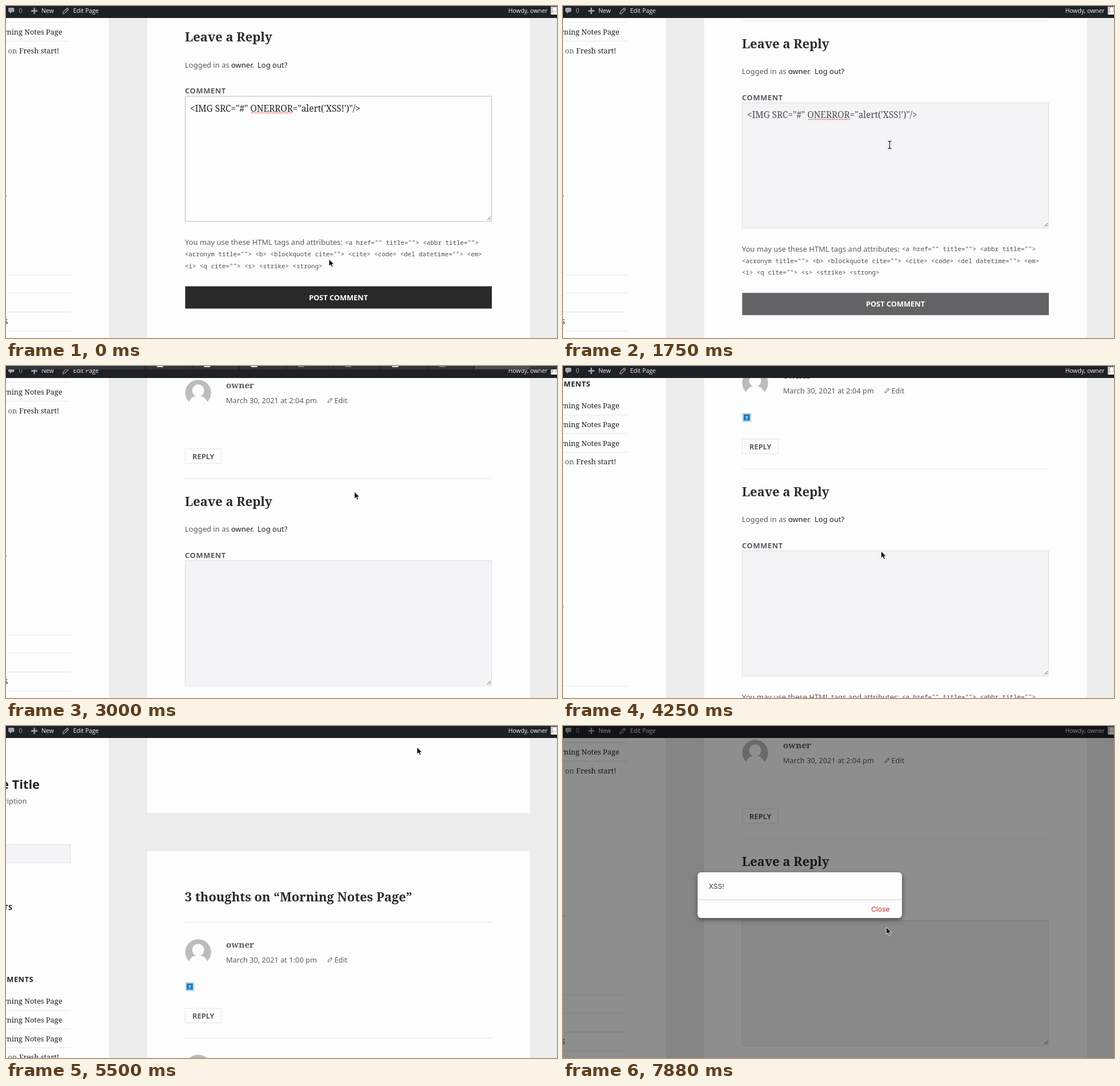
Recreate the animation shown at these times as an HTML page. Size 964 px wide and 581 px high, loop 8 s.

```html
<!DOCTYPE html>
<html lang="en">
<head>
<meta charset="utf-8">
<title>Comment form</title>
<style>
html, body { margin: 0; width: 100%; height: 100%; overflow: hidden; background: #eeedee; }
svg { display: block; width: 100vw; height: 100vh; }
text { font: 12.8px "Noto Sans", "Open Sans", sans-serif; fill: #5c5b5d; white-space: pre; }
.serif { font-family: "Noto Serif", serif; fill: #222123; }
.bold { font-weight: 700; }
.form { font-size: 13px; }
.h2 { font-size: 21.9px; font-weight: 700; fill: #2a292b; }
.name { font: 700 15.2px "Noto Serif", serif; }
.dark { fill: #222123; }
.caps { letter-spacing: .04em; }
.code { font: 10.83px "Noto Sans Mono", monospace; fill: #504f51; }
.bar text { font: 10.4px "Open Sans", "Noto Sans", sans-serif; fill: #f2f2f4; }
.end { text-anchor: end; }
.mid { text-anchor: middle; }
.box { font: 15.45px "Noto Serif", serif; }
.alert text { font: 12px Inter, sans-serif; fill: #3a393b; }
.rule { stroke: #e6e5e7; }
</style>
</head>
<body>
<svg viewBox="0 0 964 581" preserveAspectRatio="none">
  <defs>
    <clipPath id="disc"><circle r="22.8"/></clipPath>
    <g id="avatar" clip-path="url(#disc)">
      <circle r="22.8" fill="#bcbbbd"/>
      <circle cy="-4" r="10.5" fill="#fefdfe"/>
      <path d="M-18 24C-17 12-10 7-5 6H5C10 7 17 12 18 24Z" fill="#fefdfe"/>
    </g>
    <path id="pencil" d="M-4 4L-3.2 1.2L2-4L4-2L-1.2 3.2ZM.6-2.6L2.6-.6" fill="none" stroke="#626164"/>
    <g id="broken">
      <rect x="-8" y="-8" width="16" height="16" fill="#c9d9e3"/>
      <rect x="-5.5" y="-5.5" width="11" height="11" fill="#1b80c2"/>
      <text class="mid bold" y="3.5" style="font-size:9px;fill:#fff">?</text>
    </g>
    <filter id="shade" x="-10%" y="-30%" width="120%" height="170%">
      <feDropShadow dx="0" dy="3" stdDeviation="4" flood-opacity=".5"/>
    </filter>
  </defs>

  <rect width="964" height="581" fill="#eeedee"/>
  <rect width="180" height="581" fill="#fefdfe"/>
  <g id="side"></g>

  <g id="page">
    <rect x="247" y="-1000" width="670" height="399" fill="#fefdfe"/>
    <rect x="246.5" y="-534.5" width="671" height="1600" fill="#fefdfe" stroke="#e9e8ea"/>
    <text class="serif h2" x="313" y="-446">3 thoughts on “Morning Notes Page”</text>
    <path class="rule" d="M313-409.5H850"/>
    <g id="comments"></g>
    <text class="serif h2" x="313" y="244.5">Leave a Reply</text>
    <text class="form" x="313" y="290">Logged in as</text>
    <text class="form dark" x="394" y="290">owner<tspan fill="#5c5b5d">.</tspan></text>
    <text class="form dark" x="440" y="290">Log out?</text>
    <text class="form bold caps" x="313" y="335.5">COMMENT</text>
    <rect id="area" x="313.5" y="340.5" width="536" height="219"/>
    <g id="typed">
      <text id="input" class="box" x="322" y="367">&lt;IMG SRC="#" ONERROR="alert('XSS!')"/&gt;</text>
      <path d="M429 369.5H502" stroke="#e2423c" stroke-width="1.6" stroke-dasharray="1.6 1.4"/>
    </g>
    <path d="M842 557L848 551M845.5 557L848 554.5" stroke="#555" fill="none"/>
    <text class="form" x="313" y="600.5">You may use these HTML tags and attributes:</text>
    <g id="tags"></g>
    <rect id="post" x="313.5" y="673" width="536.5" height="39"/>
    <text class="bold mid" x="581.5" y="697" style="fill:#fff">POST COMMENT</text>
  </g>

  <g class="bar">
    <rect width="964" height="21" fill="#1e2126"/>
    <path d="M5.5 3H13Q14.5 3 14.5 4.5V9Q14.5 10.5 13 10.5H10L7 14V10.5H5.5Q4 10.5 4 9V4.5Q4 3 5.5 3Z" fill="#a2a5a9"/>
    <text x="22.5" y="12" style="fill:#a2a5a9">0</text>
    <path d="M44 8.5H55M49.5 3V14" stroke="#a2a5a9" stroke-width="2.4"/>
    <text x="62" y="12">New</text>
    <use href="#pencil" transform="translate(104.5 8.5) scale(1.25)" style="filter:brightness(1.6)"/>
    <text x="117.5" y="12">Edit Page</text>
    <text class="end" x="947.5" y="12">Howdy, owner</text>
    <rect x="953" y="1" width="13" height="14" fill="#c6c5c7"/>
    <circle cx="960" cy="6" r="3.3" fill="#fff"/>
    <ellipse cx="960" cy="14" rx="5.5" ry="4" fill="#fff"/>
    <rect y="15" x="950" width="14" height="6" fill="#1e2126"/>
  </g>
  <g id="tabs"></g>

  <rect id="dim" width="964" height="581"/>
  <g id="alert" class="alert">
    <rect x="235.5" y="256" width="357.5" height="80" rx="6" fill="#fefdfe" filter="url(#shade)"/>
    <path d="M235.5 304H593" stroke="#cfced0"/>
    <text x="255" y="285">XSS!</text>
    <text class="end" x="571.5" y="325" style="fill:#c0302c">Close</text>
  </g>

  <path id="arrow" d="M0 0V12.5L3 9.8L5 14.3L7.2 13.3L5.2 9H9Z" fill="#111" stroke="#fff" stroke-width=".9"/>
  <path id="beam" d="M-3-6.5Q0-6.5 0-5Q0-6.5 3-6.5M0-5V5M-3 6.5Q0 6.5 0 5Q0 6.5 3 6.5" fill="none" stroke="#222" stroke-width="1.3"/>
</svg>
<script>
const LOOP = 8000, STEP = 125, SIDE_MAX = 501.5, LOWEST = 106.5;
const el = id => document.getElementById(id);
const set = (id, attrs) => { for (const k in attrs) el(id).setAttribute(k, attrs[k]); };
const show = (id, on) => set(id, { visibility: on ? 'visible' : 'hidden' });
const move = (id, x, y) => set(id, { transform: `translate(${x} ${y})` });
const clamp = (v, lo, hi) => Math.min(hi, Math.max(lo, v));
const esc = s => s.replace(/</g, '&lt;').replace(/>/g, '&gt;');
const text = (cls, x, y, s) => `<text class="${cls}" x="${x}" y="${y}">${s}</text>`;
const rule = y => `<path class="rule" d="M0 ${y}H112.5"/>`;

// Piecewise linear track: rows of [time, value, ...]
function track(rows, t, col = 1) {
  let i = 0;
  while (i < rows.length - 2 && t >= rows[i + 1][0]) i++;
  const a = rows[i], b = rows[i + 1];
  return a[col] + (b[col] - a[col]) * clamp((t - a[0]) / (b[0] - a[0]), 0, 1);
}

el('side').innerHTML =
  text('bold end dark h2', 59, -392, 'Site Title') +
  text('end', 36.5, -366, 'Site description') +
  '<rect x="-100" y="-294" width="212.5" height="32" fill="#f4f3f5" stroke="#e2e1e3"/>' +
  text('bold caps end dark', 11.5, -180, 'RECENT POSTS') +
  text('bold caps end dark', 48, -54, 'RECENT COMMENTS') +
  [-15.2, 17.5, 50].map(y => text('serif end', 98.5, y, 'on Morning Notes Page')).join('') +
  '<text class="serif" x="3.5" y="82.5"><tspan fill="#5c5b5d">on</tspan></text>' +
  text('serif', 23, 82.5, 'Fresh start!') +
  [-3.5, 28.5, 61.5, 470.5, 502.5, 535.5, 568.5].map(rule).join('') +
  '<rect y="331" width="1" height="2" fill="#777"/>' +
  text('serif end', 3.5, 556.5, 'Entries RSS');

el('comments').innerHTML = ['1:00', '1:01', '2:04'].map((time, i) =>
  `<g transform="translate(0 ${(i - 2) * 202})">
    <use href="#avatar" x="336.2" y="46.8"/>
    ${text('name', 385, 39, 'owner')}
    ${text('', 385, 64.5, `March 30, 2021 at ${time} pm`)}
    <use href="#pencil" x="567" y="60"/>${text('', 574.5, 64.5, 'Edit')}
    <use class="pic" href="#broken" x="321.5" y="107"/>
    <rect x="313.5" y="145" width="63" height="25.5" fill="none" stroke="#e4e3e5"/>
    ${text('bold mid', 345.3, 162.5, 'REPLY')}
    <path class="rule" d="M313 197H850"/>
  </g>`).join('');

el('tags').innerHTML = [
  [593, '<a href="" title=""> <abbr title="">'],
  [313, '<acronym title=""> <b> <blockquote cite=""> <cite> <code> <del datetime=""> <em>'],
  [313, '<i> <q cite=""> <s> <strike> <strong>']
].map(([x, s], i) => text('code', x, 600 + i * 20.5, esc(s))).join('');

el('tabs').innerHTML = '<rect width="964" height="22" fill="#343538"/>' +
  '<rect x="820" width="97" height="22" fill="#4b4c4f"/>' +
  [0, 1, 2, 3, 4, 5, 6, 7].map(i => {
    const x = 243.5 + i * 82.3;
    const tone = [0, 1, 2, 5].includes(i) ? '#e8e8ea' : '#77787c';
    const icon = `<rect x="${x + 20}" y="6" width="12" height="12" rx="2" fill="${tone}"/>`;
    return `<path d="M${x} 0V22" stroke="#18191c"/>` + (i < 7 ? icon : '');
  }).join('');

const pics = document.querySelectorAll('.pic');
const POSTED = 2250, CLOSED = 3375, RELOADED = 6750;
const scroll = [[1625, -182.5], [1750, -171], [2250, 0], [3375, 0], [3750, -LOWEST], [4000, -LOWEST],
  [4250, -17], [4500, 300], [4750, 603], [4875, 690], [5000, 735], [5125, 753]];
const pointer = [[0, 565, 443], [500, 542, 497], [750, 542, 497], [875, 549.5, 325],
  [1250, 549.5, 325], [1375, 571.5, 243], [1750, 571.5, 243], [3000, 609.5, 220],
  [3250, 556.5, 324], [4750, 556.5, 324], [5125, 572, 290], [5500, 719, 37],
  [7000, 719, 37], [7125, 538.5, 152], [7500, 560, 310], [7875, 565.5, 352]];
const dialog = [[3000, 0], [3125, 1], [3250, 1], [CLOSED, 0], [7250, 0], [7500, 1], [7875, 1]];
const strip = [[2750, 0], [3000, 6], [3250, 0]];

function draw(t) {
  const posted = t >= POSTED, blurred = t >= 500, reloaded = t >= RELOADED;
  const y = reloaded ? 0 : track(scroll, t);
  move('page', 0, y);
  move('side', 0, t < 4000 || reloaded ? 0 : clamp(y + LOWEST, 0, SIDE_MAX));

  set('area', blurred ? { fill: '#f4f3f5', stroke: '#e0dfe1' } : { fill: '#fefdfe', stroke: '#bdbcbe' });
  el('input').style.fill = blurred ? '#4e4d4f' : '#222123';
  show('typed', !posted);
  set('post', { fill: t >= 375 && !posted ? '#636264' : '#292929' });
  const broken = t >= CLOSED && !reloaded;
  pics.forEach(p => p.setAttribute('visibility', broken ? 'visible' : 'hidden'));

  move('tabs', 0, track(strip, t) - 22);
  const shown = track(dialog, t);
  set('dim', { opacity: 0.44 * shown });
  set('alert', { opacity: shown });

  const px = track(pointer, t, 1), py = track(pointer, t, 2);
  const typing = t >= 875 && !posted;
  move('arrow', px, py);
  move('beam', px, py);
  show('arrow', !typing);
  show('beam', typing);
}

const start = performance.now();
function tick() {
  const t = (performance.now() - start) % LOOP;
  draw(Math.floor(t / STEP) * STEP);
  requestAnimationFrame(tick);
}
tick();
</script>
</body>
</html>
```
